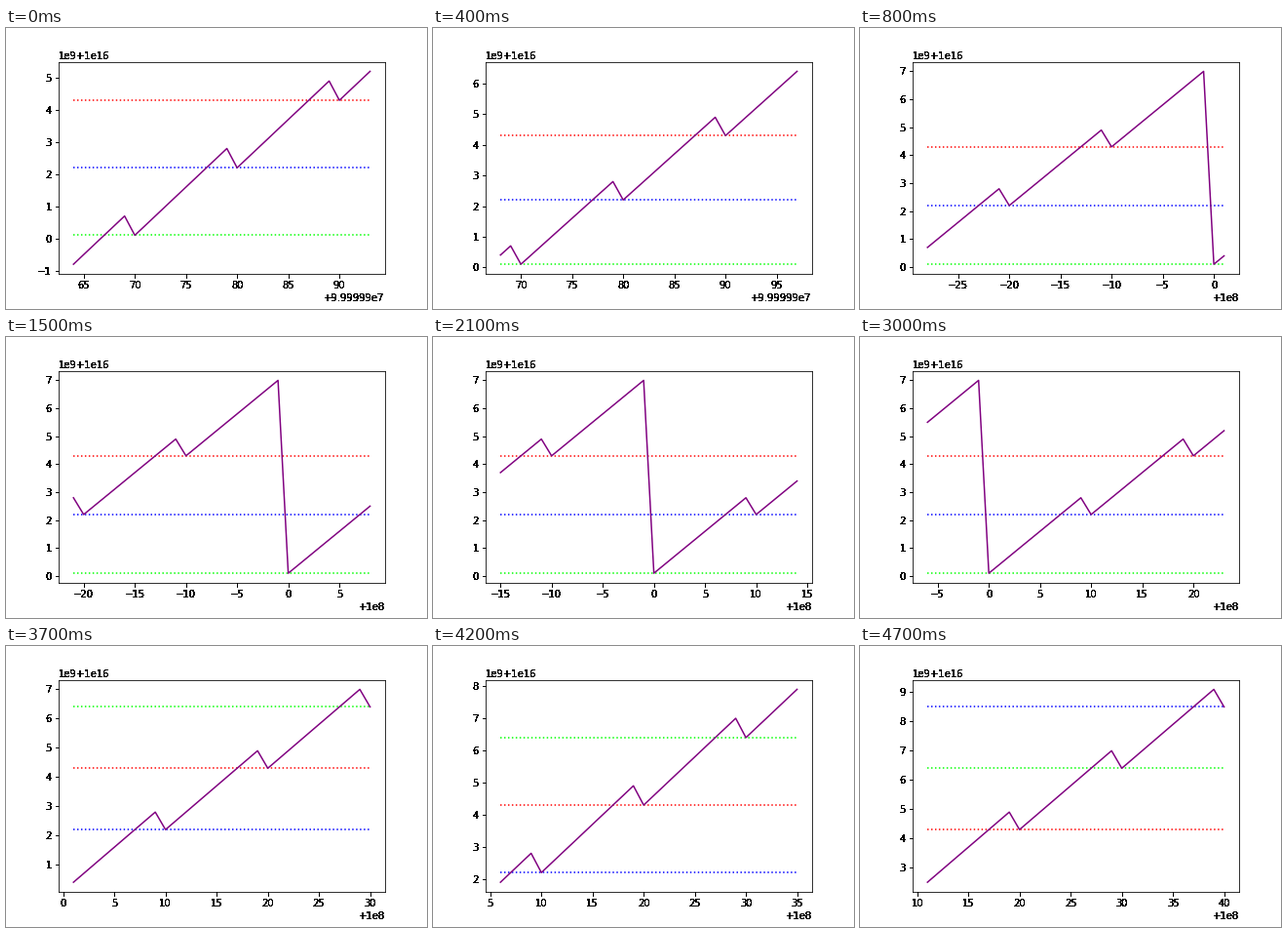
A matplotlib script for the animation above (4.8 s loop, 432 px wide and 288 px high).

```python
import matplotlib.pyplot as plt
import numpy as np
from matplotlib.animation import FuncAnimation

FRAMES, INTERVAL = 48, 100
WINDOW = 30
CENTER = 10**8      # the sawtooth drops back here
FIRST = -36         # left end of the first window, relative to CENTER
COLORS = ["lime", "blue", "red"]

plt.rcParams.update({"font.family": "DejaVu Sans", "font.size": 10,
                     "figure.subplot.bottom": 0.125})
fig, ax = plt.subplots(figsize=(6, 4), dpi=72)


def value(m):
    """Sawtooth height at CENTER + m."""
    level = 0.3 * m - 0.9 * np.floor(m / 10) + np.where(m < 0, 6.4, 0.1)
    return 1e16 + 1e9 * level


def harden(img, dpi):
    """Turn soft edges into solid pixels."""
    img[..., 3] = img[..., 3] > 0.12
    return img, 0, 0


def update(i):
    ax.clear()
    for axis in (ax.xaxis, ax.yaxis):
        axis.set_agg_filter(harden)

    m = np.arange(WINDOW) + FIRST + i
    x = CENTER + m
    for k in m[m % 10 == 0]:
        ax.plot(x[[0, -1]], [value(k)] * 2, ":", color=COLORS[k // 10 % 3])
    ax.plot(x, value(m), color="purple")
    return ax.lines


anim = FuncAnimation(fig, update, frames=FRAMES, interval=INTERVAL,
                     init_func=lambda: [], repeat=True, repeat_delay=0)
plt.show()
```
